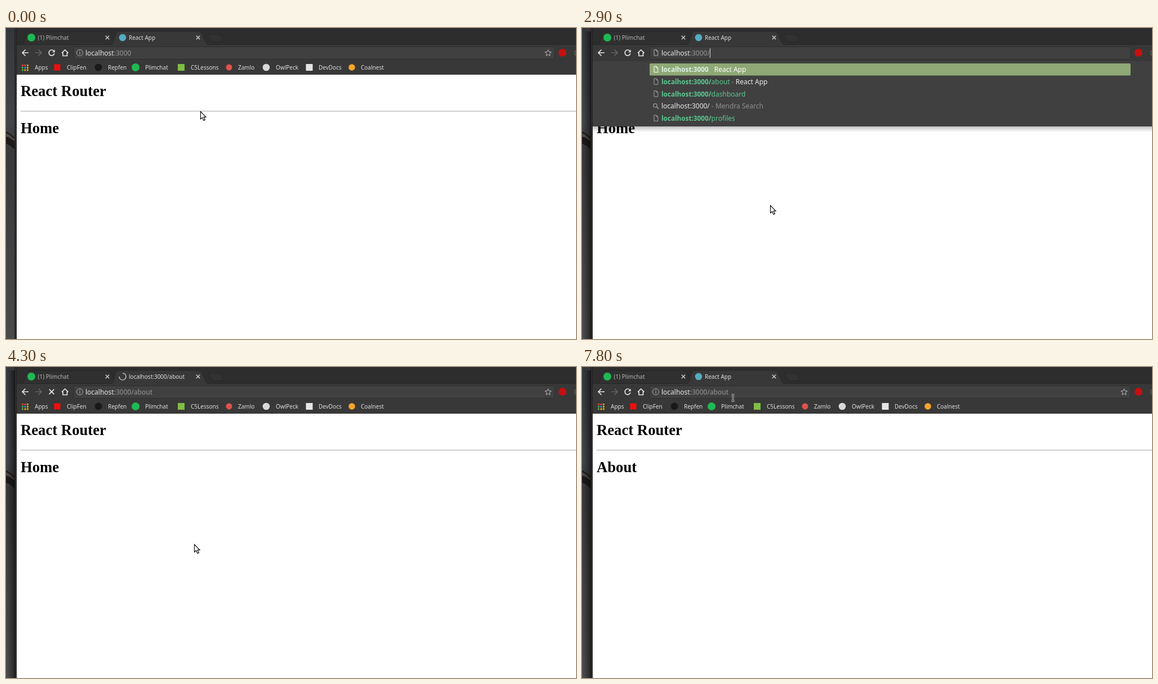
These frames come from a looping animation (1012x553 px, 8 s). An HTML page:

```html
<!DOCTYPE html>
<html lang="en">
<head>
<meta charset="utf-8">
<title>Router demo</title>
<style>
  html, body { margin: 0; width: 100%; height: 100%; overflow: hidden; background: #fff; }
  svg { display: block; width: 1012px; height: 553px; }
  text { font: 12px "Noto Sans", "Open Sans", sans-serif; white-space: pre; }
  .ui { font-size: 10px; fill: #dedede; }
  .bold { font-size: 11.75px; font-weight: 700; }
  .h1 { font: 700 26.7px "Liberation Serif", "Noto Serif", serif; }
  .line { fill: none; stroke: #e4e4e4; stroke-width: 1.7; }
  .thin { fill: none; stroke: #a8a8a8; stroke-width: 1; }
</style>
</head>
<body>
<svg viewBox="0 0 1012 553" xmlns="http://www.w3.org/2000/svg">
  <defs>
    <linearGradient id="desk" x2="0" y2="1">
      <stop offset="0" stop-color="#35363a"/>
      <stop offset=".3" stop-color="#434448"/>
      <stop offset=".4" stop-color="#38383a"/>
      <stop offset="1" stop-color="#4a4a4b"/>
    </linearGradient>
    <linearGradient id="glow">
      <stop offset="0" stop-opacity="0"/>
      <stop offset="1" stop-opacity=".5"/>
    </linearGradient>
    <linearGradient id="drop" x2="0" y2="1">
      <stop offset="0" stop-opacity=".25"/>
      <stop offset="1" stop-opacity="0"/>
    </linearGradient>
  </defs>
  <g id="back"></g>
  <g id="live"></g>
</svg>
<script>
const LOOP = 8000, GREEN = '#8fa876', URL_X = 141;
const HOST = 'localhost', PORT = ':3000';
const $ = id => document.getElementById(id);

const rect = (x, y, w, h, fill, more = '') =>
  `<rect x="${x}" y="${y}" width="${w}" height="${h}" fill="${fill}" ${more}/>`;
const dot = (x, y, r, fill) => `<circle cx="${x}" cy="${y}" r="${r}" fill="${fill}"/>`;
const path = (d, cls, more = '') => `<path d="${d}" class="${cls}" ${more}/>`;
const text = (x, y, s, cls = '', fill = '') =>
  `<text x="${x}" y="${y}" class="${cls}" ${fill && `fill="${fill}"`}>${s}</text>`;
const span = (s, fill, cls = '', dx = 0) =>
  `<tspan fill="${fill}" class="${cls}" dx="${dx}">${s}</tspan>`;

const pen = document.createElement('canvas').getContext('2d');
const width = s => {
  pen.font = '12px "Noto Sans", "Open Sans", sans-serif';
  return pen.measureText(s).width;
};

// [time, x, y, shape]
const POINTER = [
  [0, 345, 148, 'arrow'], [100, 317, 121, 'arrow'],
  [300, 305, 108, 'arrow'], [400, 280, 84, 'arrow'], [500, 256, 62, 'arrow'],
  [600, 237, 48, 'beam'], [700, 229, 46, 'beam'], [800, 240, 46, 'beam'],
  [1200, 241, 44, 'beam'], [1400, 242, 44, 'beam'],
  [1600, 262, 94, 'arrow'], [1700, 297, 200, 'arrow'], [1800, 323, 285, 'arrow'],
  [1900, 334, 315, 'arrow'], [5100, 207, 264, 'arrow'],
  [5300, 110, 222, 'arrow'], [5400, 46, 191, 'beam'], [5600, 34, 187, 'beam'],
  [5800, 40, 184, 'beam'], [5900, 31, 186, 'beam'],
  [6200, 78, 188, 'beam'], [6300, 122, 190, 'beam'],
  [7300, 278, 34, 'arrow'], [7500, 281, 26, 'arrow'], [7800, 268, 55, 'beam']
];

// [time, typed path]
const TYPED = [
  [2300, ''], [2900, '/'], [3200, '/a'], [3400, '/ab'],
  [3500, '/abo'], [3700, '/abou'], [3900, '/about']
];

const at = (list, t) => list.filter(k => k[0] <= t).pop();

const pageIcon = (y, color) =>
  `<path d="M128 ${y - 5.5}h4l2.8 2.8v7.7h-6.8zM132 ${y - 5.5}v2.8h2.8" fill="none" stroke="${color}"/>`;
const lensIcon = y =>
  `<path d="M132.5 ${y + 1.5}l3.7 3.7" stroke="#a0a0a0" stroke-width="1.6"/>` +
  `<circle cx="130" cy="${y - 1}" r="3.2" fill="none" stroke="#a0a0a0" stroke-width="1.2"/>`;
const cross = (x, y, r, w, color) =>
  `<path d="M${x - r} ${y - r}l${2 * r} ${2 * r}m0 ${-2 * r}l${-2 * r} ${2 * r}" stroke="${color}" stroke-width="${w}"/>`;

function drawBack() {
  const apps = ['#e8453c', '#e8453c', '#f0a030', '#4caf50', '#4285f4', '#f4b400', '#4caf50', '#f4b400', '#f4b400'];
  const marks = [
    [51, 'Apps'], [108, 'ClipFen'], [181, 'Repfen'], [247, 'Plimchat'], [328, 'C5Lessons'],
    [412, 'Zamlo'], [479, 'OwlPeck'], [555, 'DevDocs'], [630, 'Coalnest']
  ];
  $('back').innerHTML =
    rect(0, 0, 19, 553, 'url(#desk)') +
    '<path d="M0 184C6 186 11 192 16 195V216C10 212 6 207 0 206Z" fill="#1d1a1a"/>' +
    '<path d="M0 187C6 189 11 194 16 198V202C10 198 6 194 0 193Z" fill="#4d4746"/>' +
    rect(15, 0, 4, 553, '#202020') + rect(16.5, 0, 1, 553, '#3c3c3c') +
    rect(19, 0, 993, 30, '#2d2d2d') + rect(19, 29.5, 993, 53.5, '#383838') +
    '<path d="M28 29.5C33 28 34 7 40 6.5H183C188 7 190 21 194 29.5" fill="#303030" stroke="#262626"/>' +
    '<path d="M358 11.500H379Q381 12 382 15L386 24.500H369Q366 24 364 21Z" fill="#313131" stroke="#272727"/>' +
    '<path d="M19 29.500H187C192 28 193 7 199 6H344C350 7 352 28 359 29.500H1012" fill="#383838" stroke="#272727"/>' +
    rect(188, 29, 170, 2, '#383838') +
    dot(45, 17, 7, '#1fb954') +
    text(56.500, 21, '(1) Plimchat', 'ui', '#b4b4b4').replace('class="ui"', 'class="ui" style="fill:#b4b4b4"') +
    cross(180, 17, 3.2, 1.4, '#d0d0d0') + cross(341, 17, 3.2, 1.4, '#d0d0d0') +
    path('M40 44H29M34.500 38.500L29 44L34.500 49.500', 'line') +
    path('M52 44H63M57.500 38.500L63 44L57.500 49.500', 'line', 'style="stroke:#626262"') +
    path('M99 44.500L104.700 39L110.500 44.500M101 43.500V49.500H108.500V43.500', 'line') +
    rect(120.500, 33.500, 853.500, 22, '#404040', 'rx="2" stroke="#2e2e2e"') +
    dot(988, 44, 7, '#c4100e') +
    '<circle cx="1014" cy="44" r="4.500" fill="none" stroke="#686868" stroke-width="1.300"/>' +
    apps.map((c, i) => rect(28 + i % 3 * 4.5, 65 + Math.floor(i / 3) * 4.2, 2.8, 2.8, c)).join('') +
    rect(85.500, 64.500, 11, 11, '#f00d0d') + dot(164, 70, 6.5, '#191919') +
    dot(230, 70, 7, '#1fb954') + rect(305, 64, 12, 12, '#80bd45') +
    dot(396, 70, 5.5, '#df524b') + dot(462, 70, 6.3, '#d9d9d9') +
    rect(532.500, 64, 12, 12, '#e4e4e4') + dot(614, 70, 5.8, '#f5a62a') +
    marks.map(([x, s]) => text(x, 74, s, 'ui')).join('') +
    rect(19, 83, 993, 470, '#fff') +
    text(26, 120.500, 'React Router', 'h1') +
    rect(26, 147.500, 986, 1, '#929292') + rect(26, 148.500, 986, .5, '#e2e2e2');
}

function drawTab(loading) {
  if (!loading) return dot(207, 17, 6.3, '#55abc1') + text(218, 21, 'React App', 'ui');
  return '<path d="M207 11A6 6 0 1 1 201 17" fill="none" stroke="#b8b8b8" stroke-width="1.600"/>' +
    text(218, 21, 'localhost:3000/about', 'ui');
}

function drawReload(loading) {
  if (loading) return cross(81, 44, 4.3, 1.8, '#e4e4e4');
  return path('M85 40.800A5 5 0 1 0 86 45.300', 'line') +
    '<path d="M86.700 38.500V43.200H82Z" fill="#e4e4e4"/>';
}

function drawPage(t) {
  if (t < 4600) return text(26, 187, 'Home', 'h1');
  const picked = t >= 6200 && t < 6900;
  const edge = t < 6300 ? 78 : 98;
  return (picked ? rect(26, 168, edge - 26, 25, GREEN) : '') + text(26, 187, 'About', 'h1');
}

function drawUrl(t, tail, popup) {
  const allPicked = t >= 1400 && t < 2300;
  const editing = t >= 2300 && t < 4300;
  const full = t >= 3200 ? '/about' : tail;
  const caret = URL_X + width(HOST + PORT + tail);
  const end = URL_X + width(HOST + PORT + full);
  const typing = editing && tail !== full;
  let out = '';
  if (allPicked) out += rect(142, 36, 81, 17, GREEN);
  if (typing) out += rect(caret, 36, end - caret, 17, GREEN);
  const grey = allPicked ? '#fff' : '#989898';
  out += text(URL_X, 48.500, span(HOST, allPicked ? '#fff' : '#e6e6e6') + span(PORT + tail, grey) +
    (typing ? span(full.slice(tail.length), '#fff') : ''));
  if (editing && !typing) out += rect(Math.round(caret), 36, 1, 17, '#d8d8d8');
  if (popup) return out + pageIcon(44, '#b0b0b0');
  return out + '<circle cx="131" cy="44" r="5.500" class="thin"/>' +
    rect(130.400, 43, 1.2, 4, '#a8a8a8') + rect(130.400, 40.800, 1.2, 1.3, '#a8a8a8') +
    path('M962.500 38.700L964.100 42.400L968.100 42.800L965.100 45.400L966 49.400L962.500 47.300L959 49.400L959.900 45.400L956.900 42.800L960.900 42.400Z',
      'thin', 'style="stroke:#bcbcbc"');
}

function drawPopup(t, tail) {
  const bottom = t < 3200 ? 175 : t < 3400 ? 121 : t < 3500 ? 113 : 109.5;
  const mint = '#5cc792', grey = '#909090', white = '#ececec', base = HOST + PORT;
  const search = span(base + tail, white) + span(' - Mendra Search', grey);
  const top = span(base + (t < 3200 ? '' : '/about'), '#dcf3e6', 'bold') + span('React App', '#fff', '', 10);
  const link = s => span(base + '/', mint, 'bold') + span(s, mint);
  const rows = t < 3200
    ? [top, link('about') + span(' - ', grey) + span('React App', white), link('dashboard'), search, link('profiles')]
    : [top, search];
  return rect(19, bottom, 993, 10, 'url(#drop)') +
    rect(19, 59, 993, bottom - 59, '#404040') +
    rect(120, 63, 854, 21.5, GREEN, 'rx="2"') +
    rows.map((row, i) => {
      const y = 73.7 + i * 21.7;
      const icon = row === search ? lensIcon(y) : pageIcon(y, i ? '#a0a0a0' : '#fff');
      return icon + text(URL_X, y + 4.4, row);
    }).join('');
}

function drawPointer(x, y, shape) {
  if (shape === 'arrow') {
    return `<path transform="translate(${x} ${y})" d="M.5 .5V14L3.600 11.200L6 16.500L8.400 15.400L6 10.300H10Z" fill="#fff" stroke="#111" stroke-width="1.200"/>`;
  }
  const d = 'M-2.500 -5.500H-1L0 -4.800L1 -5.500H2.500M0 -4.800V4.800M-2.500 5.500H-1L0 4.800L1 5.500H2.500';
  return `<g transform="translate(${x} ${y})" fill="none">` +
    `<path d="${d}" stroke="#f2f2f2" stroke-width="2.600"/><path d="${d}" stroke="#111" stroke-width="1.100"/></g>`;
}

function render(t) {
  const popup = t >= 2900 && t < 4300;
  const loading = t >= 4300 && t < 4600;
  const tail = (at(TYPED, t) || [0, ''])[1];
  const [, x, y, shape] = at(POINTER, t);
  return (t >= 1400 ? rect(3, 6, 13, 547, 'url(#glow)') : '') +
    drawTab(loading) + drawReload(loading) + drawPage(t) + drawUrl(t, tail, popup) +
    (popup ? drawPopup(t, tail) : '') + drawPointer(x, y, shape);
}

let shown = '';
function tick() {
  const next = render(performance.now() % LOOP);
  if (next !== shown) $('live').innerHTML = shown = next;
  requestAnimationFrame(tick);
}

drawBack();
tick();
</script>
</body>
</html>
```
